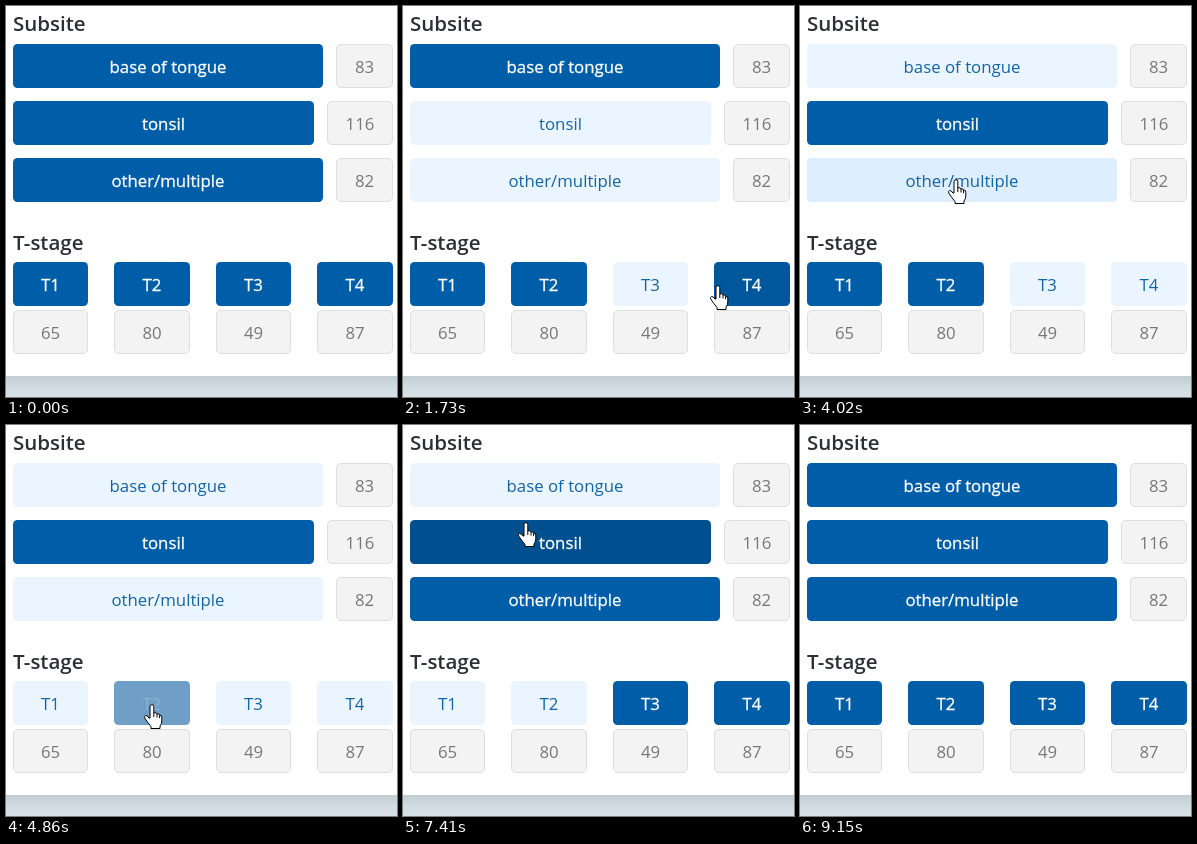
Write an HTML page that moves like this. It is 391 px wide and 391 px high and loops after 9350 ms.

```html
<!DOCTYPE html>
<html lang="en">
<head>
<meta charset="utf-8">
<title>Subsite and T-stage filter</title>
<style>
  html, body { margin: 0; height: 100%; overflow: hidden; background: #fff; }
  svg { display: block; width: 100vw; height: 100vh; }
  text { font: 16.8px "Open Sans", "Noto Sans", sans-serif; text-anchor: middle; }
  .head { font-size: 20.5px; font-weight: 600; text-anchor: start; fill: #2b3036; }
  .count rect { fill: #f3f3f3; stroke: #dedede; }
  .count text { fill: #777; }
  #cursor path { fill: #fff; stroke: #000; stroke-linejoin: round; }
</style>
</head>
<body>
<svg viewBox="0 0 391 391">
  <defs>
    <linearGradient id="shade" x2="0" y2="1">
      <stop offset="0" stop-color="#c2cdd3"/>
      <stop offset=".5" stop-color="#d0dbe1"/>
      <stop offset="1" stop-color="#d7e1e7"/>
    </linearGradient>
  </defs>
  <rect y="370" width="391" height="21" fill="url(#shade)"/>
  <text class="head" x="7" y="24.5">Subsite</text>
  <text class="head" x="7" y="244">T-stage</text>
  <g id="panel"></g>
  <g id="cursor">
    <path id="arrow" d="M.5.5V17l3.9-3.7 2.6 5.9 2.6-1.1-2.6-5.8h5z"/>
    <path id="hand" d="M-2 13V1.6a1.9 1.9 0 0 1 3.8 0V8q2.8-1.2 3.2 1 2.4-.8 2.6 1.2 2.2-.3 2.2 2V16q0 3-1.8 5v2.5H-1V21.5q-3-3.5-6-8-1.4-2.5.6-3 1.8-.2 3.4 2.6zM1.8 8v4M5 9v3.5M7.6 10.2v3"/>
  </g>
</svg>
<script>
const LOOP = 9350, FADE = 70, LEFT = 7, RIGHT = 387, HEIGHT = 44;

const colors = {
  on: [0, 94, 168], onHover: [0, 80, 143],
  off: [235, 245, 255], offHover: [221, 238, 255],
  textOn: [255, 255, 255], textOff: [18, 100, 168]
};

const $ = id => document.getElementById(id);

function add(parent, tag, attrs, text = "") {
  const el = document.createElementNS("http://www.w3.org/2000/svg", tag);
  for (const key in attrs) el.setAttribute(key, attrs[key]);
  el.textContent = text;
  return parent.appendChild(el);
}

function addBox(group, left, right, top, label, inset = 0) {
  const box = add(group, "rect", {
    x: left + inset, y: top + inset, rx: 4.5,
    width: right - left - 2 * inset, height: HEIGHT - 2 * inset
  });
  const text = add(group, "text", { x: (left + right) / 2, y: top + 29 }, label);
  return { box, text };
}

const buttons = {};

function addButton(name, left, right, top) {
  const parts = addBox(add($("panel"), "g"), left, right, top, name);
  buttons[name] = { ...parts, left, right, top, toggles: [] };
}

function addCount(count, left, right, top) {
  addBox(add($("panel"), "g", { class: "count" }), left, right, top, count, 0.5);
}

// wide rows: the count box grows with its digits
Object.entries({ "base of tongue": 83, tonsil: 116, "other/multiple": 82 }).forEach(([name, count], i) => {
  const top = 38 + 57 * i;
  const split = RIGHT - 39 - 9 * String(count).length;
  addButton(name, LEFT, split - 13, top);
  addCount(count, split, RIGHT, top);
});

// four columns with the count below
[65, 80, 49, 87].forEach((count, i) => {
  const left = Math.round(LEFT + 101.4 * i), right = Math.round(82.4 + 101.4 * i);
  addButton("T" + (i + 1), left, right, 256);
  addCount(count, left, right, 304);
});

const pass = (time, x, y) => ({ arrive: time, leave: time, x, y });

// rest on a button, press it, then move on
function press(name, time, x, rest = 70) {
  const b = buttons[name];
  b.toggles.push(time);
  return { arrive: time - rest, leave: time, x: x ?? (b.left + b.right) / 2, y: b.top + 24 };
}

const trips = [
  [pass(70, 336, 370), press("tonsil", 610, 220), press("other/multiple", 1030, 208),
    press("T3", 1450), press("T4", 2000, undefined, 130)],
  [pass(3060, 352, 174), press("base of tongue", 3420, 170), press("tonsil", 3810, 158),
    pass(4030, 156, 176), press("T1", 4440), press("T2", 4860),
    press("T3", 5340), press("T4", 5690)],
  [pass(6560, 345, 290), pass(6700, 220, 286), press("other/multiple", 7270, 125, 220),
    press("base of tongue", 7690, 122, 213), press("T1", 8380, undefined, 200),
    press("T2", 8730), pass(9140, 350, 391)]
];

function pointer(t) {
  const trip = trips.find(p => t >= p[0].arrive && t <= p.at(-1).leave);
  if (!trip) return null;
  const i = trip.findIndex(stop => t <= stop.leave);
  const to = trip[i], from = trip[i - 1] ?? to;
  const k = t >= to.arrive ? 1 : (t - from.leave) / (to.arrive - from.leave);
  return { x: from.x + (to.x - from.x) * k, y: from.y + (to.y - from.y) * k };
}

const inside = (b, p) => p && p.x >= b.left && p.x < b.right && p.y >= b.top && p.y < b.top + HEIGHT;

function look(b, t) {
  const on = b.toggles.filter(x => x <= t).length % 2 === 0;
  const hover = inside(b, pointer(t)) ? "Hover" : "";
  return { on, fill: colors[(on ? "on" : "off") + hover], ink: colors[on ? "textOn" : "textOff"] };
}

const mix = (a, b) => `rgb(${a.map((v, i) => Math.round((v + b[i]) / 2))})`;

function draw(t) {
  for (const b of Object.values(buttons)) {
    const past = look(b, t - FADE), now = look(b, t);
    b.box.style.fill = mix(past.fill, now.fill);
    b.text.style.fill = b.text.style.stroke = mix(past.ink, now.ink);
    b.text.style.strokeWidth = now.on ? 0.3 : 0;
  }
  const p = pointer(t);
  $("cursor").style.display = p ? "" : "none";
  if (!p) return;
  const hand = Object.values(buttons).some(b => inside(b, p));
  $("hand").style.display = hand ? "" : "none";
  $("arrow").style.display = hand ? "none" : "";
  $("cursor").setAttribute("transform", `translate(${Math.round(p.x)} ${Math.round(p.y)})`);
}

const begin = performance.now();
function tick() {
  draw((performance.now() - begin) % LOOP);
  requestAnimationFrame(tick);
}
tick();
</script>
</body>
</html>
```
